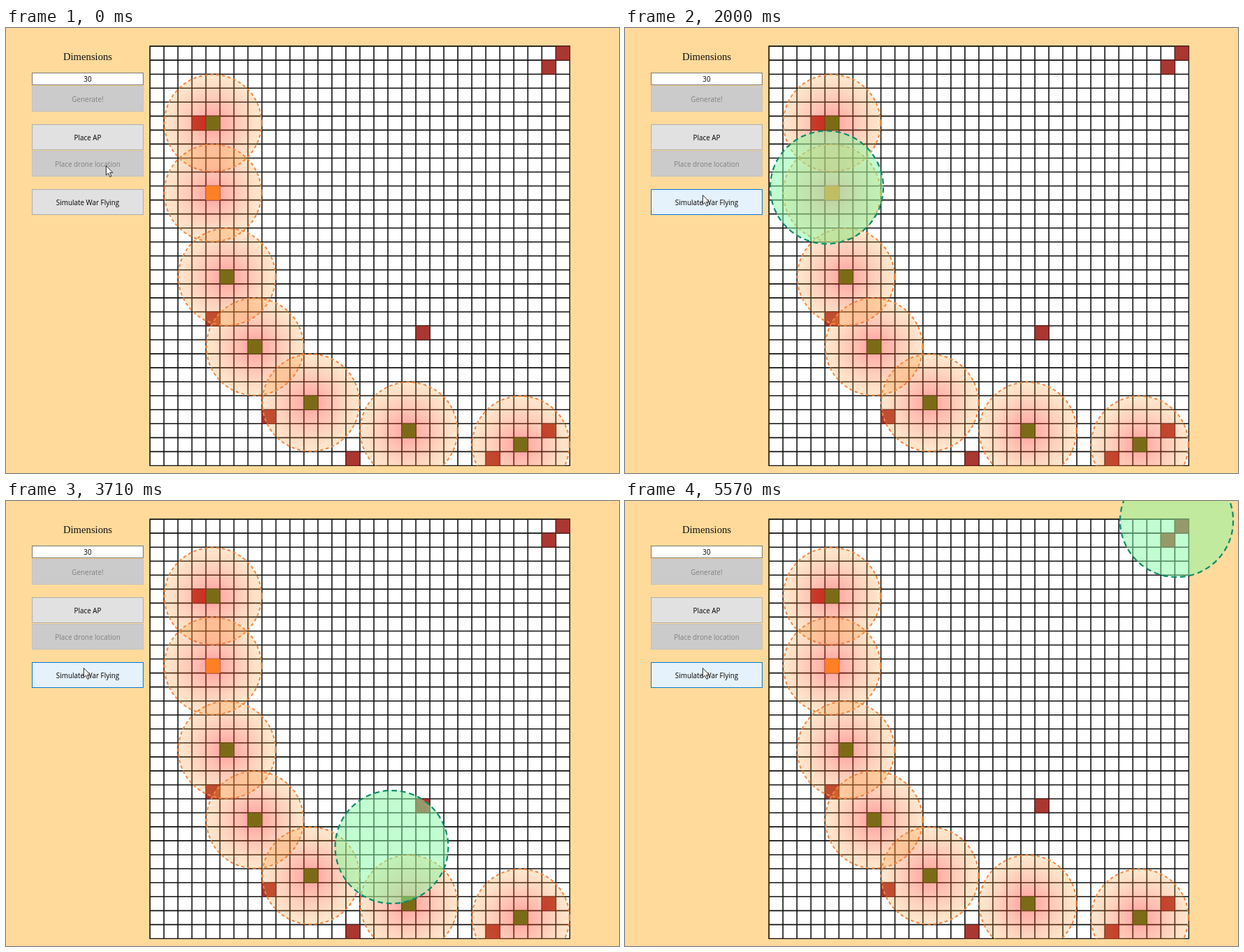
An HTML page that plays this animation: 878x638 px, repeating every 5.72 s.

```html
<!DOCTYPE html>
<html lang="en">
<head>
<meta charset="utf-8">
<title>War flying simulation</title>
<style>
html, body { margin: 0; width: 100%; height: 100%; overflow: hidden; background: #ffda9b; }
svg { display: block; width: 878px; height: 638px; }
.ui { font: 9.9px "Open Sans", "Noto Sans", sans-serif; text-anchor: middle; }
.title { font: 14.7px "Liberation Serif", "Times New Roman", serif; text-anchor: middle; }
</style>
</head>
<body>
<svg id="stage" viewBox="0 0 878 638" xmlns="http://www.w3.org/2000/svg">
  <defs>
    <radialGradient id="signal">
      <stop offset="0" stop-color="#ff0a0a" stop-opacity=".4"/>
      <stop offset="1" stop-color="#ffa032" stop-opacity=".24"/>
    </radialGradient>
    <clipPath id="field"><rect x="205" y="25" width="603.5" height="603.3"/></clipPath>
  </defs>
  <rect width="878" height="638" fill="#ffda9b"/>
  <text class="title" x="117" y="46" fill="#111">Dimensions</text>
  <g id="panel"></g>
  <g id="board" clip-path="url(#field)"></g>
  <circle id="drone" r="81" fill="#83fba1" fill-opacity=".5" stroke="#0c8a6c" stroke-width="2.2" stroke-dasharray="7.7 5"/>
  <path id="cursor" d="M0 0V13.4L3.1 10.6L5.4 15.8L7.6 14.8L5.3 9.7H9.4Z" fill="#fff" stroke="#111" stroke-width=".9"/>
</svg>
<script>
const LOOP = 5720, STEP = 77.4, LEG = 500;
const X0 = 206.2, Y0 = 26.1, CELL = 20.045, COUNT = 30;
const $ = id => document.getElementById(id);

function add(parent, tag, attrs, text) {
  const el = document.createElementNS("http://www.w3.org/2000/svg", tag);
  for (const key in attrs) el.setAttribute(key, attrs[key]);
  if (text) el.textContent = text;
  parent.appendChild(el);
  return el;
}

// Side panel
function box(y, height, fill, stroke, label, color, baseline) {
  const rect = add($("panel"), "rect", { x: 37.5, y: y + .5, width: 159, height, fill, stroke });
  add($("panel"), "text", { class: "ui", x: 117, y: baseline, fill: color }, label);
  return rect;
}
box(64, 17, "#fff", "#777", "30", "#000", 77);
box(83, 36, "#cbcbcb", "#c1c1c1", "Generate!", "#808080", 106);
box(138, 36, "#e1e1e1", "#adadad", "Place AP", "#000", 160.5);
box(176, 36, "#cbcbcb", "#c1c1c1", "Place drone location", "#808080", 199);
const simulate = box(231, 36, "#e1e1e1", "#adadad", "Simulate War Flying", "#000", 254);

// Board
const board = $("board"), size = CELL * COUNT;
const mid = ([col, row]) => [X0 + (col + .5) * CELL, Y0 + (row + .5) * CELL];

function square(cell, fill, stroke) {
  const [x, y] = mid(cell);
  add(board, "rect", { x: x - CELL / 2, y: y - CELL / 2, width: CELL, height: CELL, fill, stroke });
}

add(board, "rect", { x: X0, y: Y0, width: size, height: size, fill: "#fff" });
let lines = "";
for (let i = 0; i <= COUNT; i++) {
  const d = i * CELL;
  lines += `M${X0 + d} ${Y0}v${size}M${X0} ${Y0 + d}h${size}`;
}
add(board, "path", { d: lines, stroke: "#111", "stroke-width": 1.6, "stroke-linecap": "square" });

const targets = [[29, 0], [28, 1], [3, 5], [4, 19], [19, 20], [8, 26], [14, 29], [24, 29], [28, 27]];
const points = [[4, 5], [4, 10], [5, 16], [7, 21], [11, 25], [18, 27], [26, 28]];
targets.forEach(cell => square(cell, "#aa3731", "#5c1a18"));
points.forEach(cell => {
  const [cx, cy] = mid(cell);
  add(board, "circle", {
    cx, cy, r: 69.6, fill: "url(#signal)", stroke: "#f5853f",
    "stroke-width": 2, "stroke-dasharray": "4.6 3.7"
  });
});
points.forEach((cell, i) =>
  i === 1 ? square(cell, "#fd8024", "#e8702a") : square(cell, "#7b6b17", "#66500f"));

// Flight: cells visited in turn, and when each leg begins
const route = [[28, 1], [3, 5], [4, 10], [4, 19], [8, 26], [14, 29], [19, 20], [24, 29], [28, 27], [29, 0]]
  .map(cell => { const [x, y] = mid(cell); return [x - 7.4, y - 8]; });
route.unshift([277, 108.7]);
const starts = [546, 1049, 1520, 2025, 2525, 3025, 3525, 4025, 4530, 5030];

const bezier = (s, a, b) => 3 * (1 - s) * (1 - s) * s * a + 3 * (1 - s) * s * s * b + s * s * s;

// cubic-bezier(.25, .1, .25, 1)
function ease(p) {
  if (p <= 0) return 0;
  if (p >= 1) return 1;
  let lo = 0, hi = 1;
  for (let i = 0; i < 24; i++) {
    const s = (lo + hi) / 2;
    if (bezier(s, .25, .25) < p) lo = s; else hi = s;
  }
  return bezier(lo, .1, 1);
}

const mix = (a, b, k) => a + (b - a) * k;

function draw(time) {
  const tick = Math.floor((time % LOOP + 18) / STEP);
  const t = Math.max(0, tick * STEP - 8);

  const k = ease((t - 70) / 380);
  const x = mix(143.4, 111.4, k), y = mix(197.6, 239.6, k);
  $("cursor").setAttribute("transform", `translate(${x} ${y})`);
  const hover = y > 231;
  simulate.setAttribute("fill", hover ? "#e5f1fb" : "#e1e1e1");
  simulate.setAttribute("stroke", hover ? "#0078d7" : "#adadad");

  const leg = starts.filter(s => s <= t).length - 1;
  const drone = $("drone");
  drone.style.display = leg < 0 ? "none" : "";
  if (leg < 0) return;
  const p = ease((t - starts[leg]) / LEG);
  const from = route[leg], to = route[leg + 1];
  drone.setAttribute("cx", mix(from[0], to[0], p));
  drone.setAttribute("cy", mix(from[1], to[1], p));
}

const begin = performance.now();
function frame() {
  draw(performance.now() - begin);
  requestAnimationFrame(frame);
}
frame();
</script>
</body>
</html>
```
